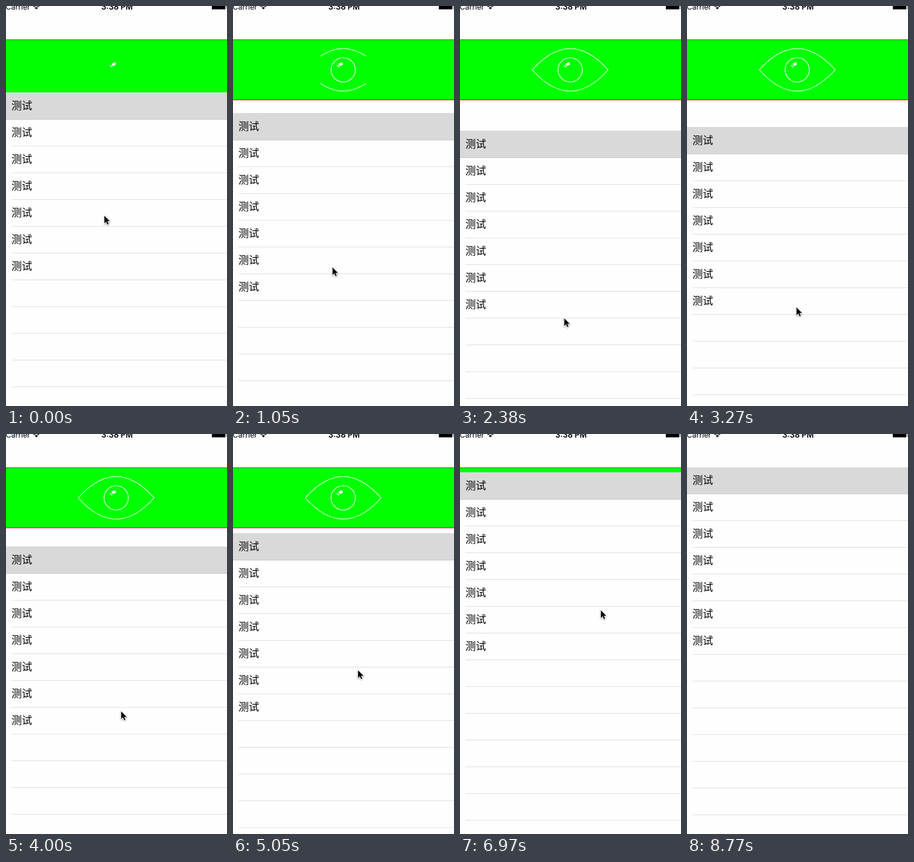
An HTML page that plays this animation: 364 px wide and 658 px high, repeating every 9370 ms.

```html
<!DOCTYPE html>
<html lang="zh-CN">
<head>
<meta charset="utf-8">
<title>Pull to open the eye</title>
<style>
html, body { margin: 0; width: 100%; height: 100%; overflow: hidden; background: #fefefe; }
svg { display: block; width: 364px; height: 658px; }
.status { font-family: Inter, Roboto, sans-serif; font-size: 12.3px; }
.row { font: 17px "Noto Sans CJK SC", "Noto Sans CJK", sans-serif; }
.eye { fill: none; stroke: #fff; stroke-width: 1.1; }
</style>
</head>
<body>
<svg viewBox="0 0 364 658">
  <rect width="364" height="658" fill="#fefefe"/>
  <rect y="55" width="364" height="99" fill="#0f0"/>
  <rect y="55" width="364" height="1" fill="#7f4a00"/>
  <rect y="154" width="364" height="1" fill="#d41c0c"/>
  <g class="eye">
    <path id="lids"/>
    <circle id="iris" cx="181.5" cy="105" r="20"/>
    <path id="glints" stroke-width="4.5"/>
  </g>
  <g id="table"><rect width="364" height="658" fill="#fefefe"/></g>
  <rect width="364" height="55" fill="#fefefe"/>
  <g class="status">
    <text x="-.5" y="6">Carrier</text>
    <text x="183" y="6" text-anchor="middle" font-size="12.8" font-weight="600">3:38 PM</text>
    <path d="M45.5 1.2Q50-2.6 54.5 1.2" fill="none" stroke="#000" stroke-width="1.6"/>
    <path d="M47.4 2.9Q50 .8 52.6 2.9L50 5.6Z"/>
    <path d="M339 0H361V5.5H339Z"/>
    <path d="M362.5 0V5" stroke="#555"/>
  </g>
  <path id="cursor" d="M0 0V12.6L3 9.8 5 14.4 7 13.6 5 9.1H9Z" stroke="#fff" stroke-width="1.6" paint-order="stroke" style="filter:drop-shadow(0 1px 1px #0006)"/>
</svg>
<script>
const LOOP = 9370, TICK = LOOP / 63;
// Moments in ticks: furthest pull, release, pointer hidden, pointer passing by, pointer gone.
const PEAK = 18, RELEASE = 46, HIDE = 52, PASS = 56, GONE = 59;
const $ = id => document.getElementById(id);
const ramp = (n, from, to) => Math.max(0, Math.min(1, (n - from) / (to - from)));

const rise = (n, power) => Math.sin(Math.PI / 2 * ramp(n, 0, PEAK)) ** power;
const fall = n => Math.max(0, n - PEAK) ** 1.3;

function tableTop(n) {
  if (n > RELEASE) return 54 + 76 * Math.exp(-2.1 * (n - RELEASE));
  return Math.max(130, 141.95 + 64 * rise(n, 1.15) - 1.18 * fall(n));
}

function pointer(n) {
  if (n >= PASS) return [186 + 82 * (n - PASS), 484 + 69 * (n - PASS)];
  return [
    Math.min(232, 162 + 0.038 * n * n),
    Math.max(290, 345 + 172 * rise(n, 1.27) - 3.49 * fall(n))
  ];
}

function buildTable() {
  let s = '<rect width="364" height="44" fill="#d9d9d9"/>';
  for (let i = 0; i < 14; i++) {
    const x = i ? 9 : 0, y = 44 * (i + 1);
    s += `<rect x="${x}" y="${y}" width="${364 - x}" height="1" fill="${i ? '#dfdfdf' : '#cbcbcb'}"/>`;
    if (i < 7) s += `<text class="row" x="9" y="${y - 16}">测试</text>`;
  }
  $('table').innerHTML += s;
}

function arc(r, from, to) {
  const p = deg => {
    const a = deg * Math.PI / 180;
    return `${181.5 + r * Math.cos(a)} ${105 + r * Math.sin(a)}`;
  };
  return `M${p(from)}A${r} ${r} 0 0 1 ${p(to)}`;
}

// Part of a lid curve that grows outward from its middle.
function lid(open, h) {
  const u = (1 - open) / 2, v = 1 - u, y = 105 + 2 * h * u * v;
  return `M${119 + 125 * u} ${y}Q181.5 ${105 + h * (u * u + v * v)} ${119 + 125 * v} ${y}`;
}

function draw(n) {
  $('table').setAttribute('transform', `translate(0 ${Math.round(tableTop(n))})`);

  const open = ramp(n, 4, 9) - ramp(n, 34, 38);
  $('lids').setAttribute('d', open ? lid(open, -70) + lid(open, 70) : '');
  $('iris').setAttribute('opacity', ramp(n, 0, 4) - ramp(n, 38, 41));

  const shown = n < HIDE || (n >= PASS && n < GONE);
  $('cursor').setAttribute('visibility', shown ? 'visible' : 'hidden');
  $('cursor').setAttribute('transform', `translate(${pointer(n)})`);
}

buildTable();
$('glints').setAttribute('d', arc(10.2, 230, 265) + arc(10.2, 211, 220));
const start = performance.now();
function frame() {
  const t = (performance.now() - start) % LOOP;
  draw(Math.min(62, Math.floor((t + 30) / TICK)));
  requestAnimationFrame(frame);
}
frame();
</script>
</body>
</html>
```
